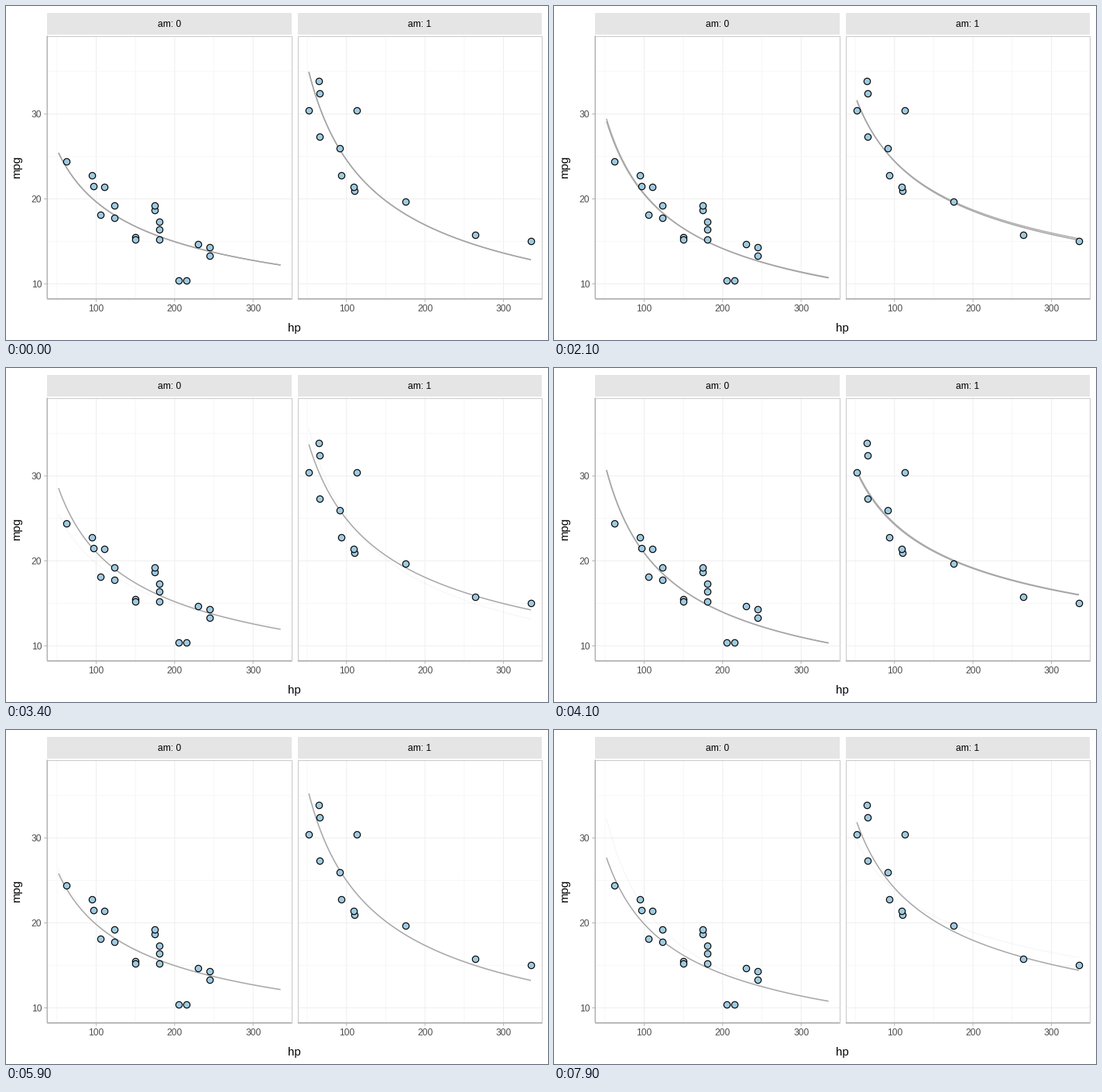
Write a matplotlib script that moves like this. It is 700x432 px and loops after 8 s.

```python
import matplotlib.pyplot as plt
import numpy as np
from matplotlib.animation import FuncAnimation

W, H, DPI = 700, 432, 100
PX = 72 / DPI  # points per pixel
STEPS = 5      # frames from one draw to the next
FRAMES = 80
DRAWS = FRAMES // STEPS + 1

plt.rcParams["font.family"] = ["Liberation Sans", "DejaVu Sans"]

# mtcars, split by transmission
CARS = [
    dict(hp=[110, 175, 105, 245, 62, 95, 123, 123, 180, 180, 180, 205, 215,
             230, 97, 150, 150, 245, 175],
         mpg=[21.4, 18.7, 18.1, 14.3, 24.4, 22.8, 19.2, 17.8, 16.4, 17.3,
              15.2, 10.4, 10.4, 14.7, 21.5, 15.5, 15.2, 13.3, 19.2]),
    dict(hp=[110, 93, 66, 52, 65, 66, 91, 113, 264, 175, 335, 109],
         mpg=[21, 22.8, 32.4, 30.4, 33.9, 27.3, 26, 30.4, 15.8, 19.7, 15,
              21.4]),
]

LEFT, WIDTH, TOP, BOTTOM = (53.2, 376.8), 315.5, 38.5, 378.6
HP = np.linspace(52, 335, 101)
GREY, LABEL, LINE = "#b3b3b3", "#4d4d4d", "#a6a6a6"


def sx(hp, panel):
    return 15.1 + 323.3 * panel + 1.0135 * np.asarray(hp)


def sy(mpg):
    return 469.1 - 10.98 * np.asarray(mpg)


def fit_draws(panel, rng):
    """Power-law fits whose slope swings and whose level varies a little."""
    x, y = np.log(CARS[panel]["hp"]), np.log(CARS[panel]["mpg"])
    slope = np.polyfit(x, y, 1)[0]
    k = np.arange(DRAWS)[:, None]
    swing = 0.11 * np.cos(2 * np.pi * k / 5.8) * (1 - 2 * panel)
    level = y.mean() + rng.normal(0, 0.03, (DRAWS, 1))
    return np.exp(level + (slope + swing) * (np.log(HP) - x.mean()))


def ease(t):
    return 2 * t * t if t < 0.5 else 1 - 2 * (1 - t) ** 2


fig = plt.figure(figsize=(W / DPI, H / DPI), dpi=DPI, facecolor="white")
ax = fig.add_axes([0, 0, 1, 1])
ax.set(xlim=(0, W), ylim=(H, 0))
ax.axis("off")


def seg(x, y, color, width=1, z=5):
    ax.plot(x, y, color=color, lw=width * PX, zorder=z, snap=False,
            solid_capstyle="butt")


def label(x, y, text, size=12, color="black", **kw):
    ax.text(x, y, text, fontsize=size * PX, color=color,
            **{"ha": "center", "va": "baseline", **kw})


def draw_panel(panel):
    x0 = LEFT[panel]
    x1 = x0 + WIDTH
    ax.add_patch(plt.Rectangle((x0, 9), WIDTH, 28, fc="#e5e5e5", lw=0))
    label((x0 + x1) / 2, 27, f"am: {panel}")

    for hp in range(50, 301, 50):
        major = hp % 100 == 0
        x = float(sx(hp, panel))
        seg([x, x], [TOP, BOTTOM], "#efefef" if major else "#f7f7f7", z=1)
        if major:
            seg([x, x], [BOTTOM, BOTTOM + 4], GREY)
            label(x, 395, str(hp), color=LABEL)
    for mpg in range(10, 36, 5):
        major = mpg % 10 == 0
        y = float(sy(mpg))
        seg([x0, x1], [y, y], "#efefef" if major else "#f7f7f7", z=1)
        if major and panel == 0:
            seg([x0 - 4, x0], [y, y], GREY)
            label(x0 - 7, y + 4.5, str(mpg), color=LABEL, ha="right")

    ax.add_patch(plt.Rectangle((x0, TOP), WIDTH, BOTTOM - TOP, fill=False,
                               ec="#cccccc", lw=1.1 * PX, zorder=4))
    seg([x0, x1], [BOTTOM, BOTTOM], GREY, 1.4)
    if panel == 0:
        seg([x0, x0], [TOP, BOTTOM], GREY, 1.4)

    cars = CARS[panel]
    ax.plot(sx(cars["hp"], panel), sy(cars["mpg"]), "o", ms=8.4 * PX,
            mfc="#9ecae1", mec="black", mew=1.15 * PX, zorder=3, snap=False)


def fit_line(panel):
    return ax.plot(sx(HP, panel), sy(fits[panel][0]), color=LINE,
                   lw=1.5 * PX, zorder=2, solid_capstyle="butt")[0]


rng = np.random.default_rng(7)
fits = [fit_draws(p, rng) for p in (0, 1)]
for p in (0, 1):
    draw_panel(p)
label(372.5, 420.5, "hp", 15)
label(18.5, 208, "mpg", 15, rotation=90, rotation_mode="anchor")

old = [fit_line(p) for p in (0, 1)]
new = [fit_line(p) for p in (0, 1)]


def update(frame):
    draw, step = divmod(frame, STEPS)
    t = ease(step / STEPS)
    for p in (0, 1):
        a, b = fits[p][draw], fits[p][draw + 1]
        old[p].set_ydata(sy(a))
        old[p].set_alpha(1 - t)
        new[p].set_ydata(sy(a + (b - a) * t))
    return old + new


anim = FuncAnimation(fig, update, frames=FRAMES, interval=100, repeat=True,
                     repeat_delay=0, blit=False)
plt.show()
```
